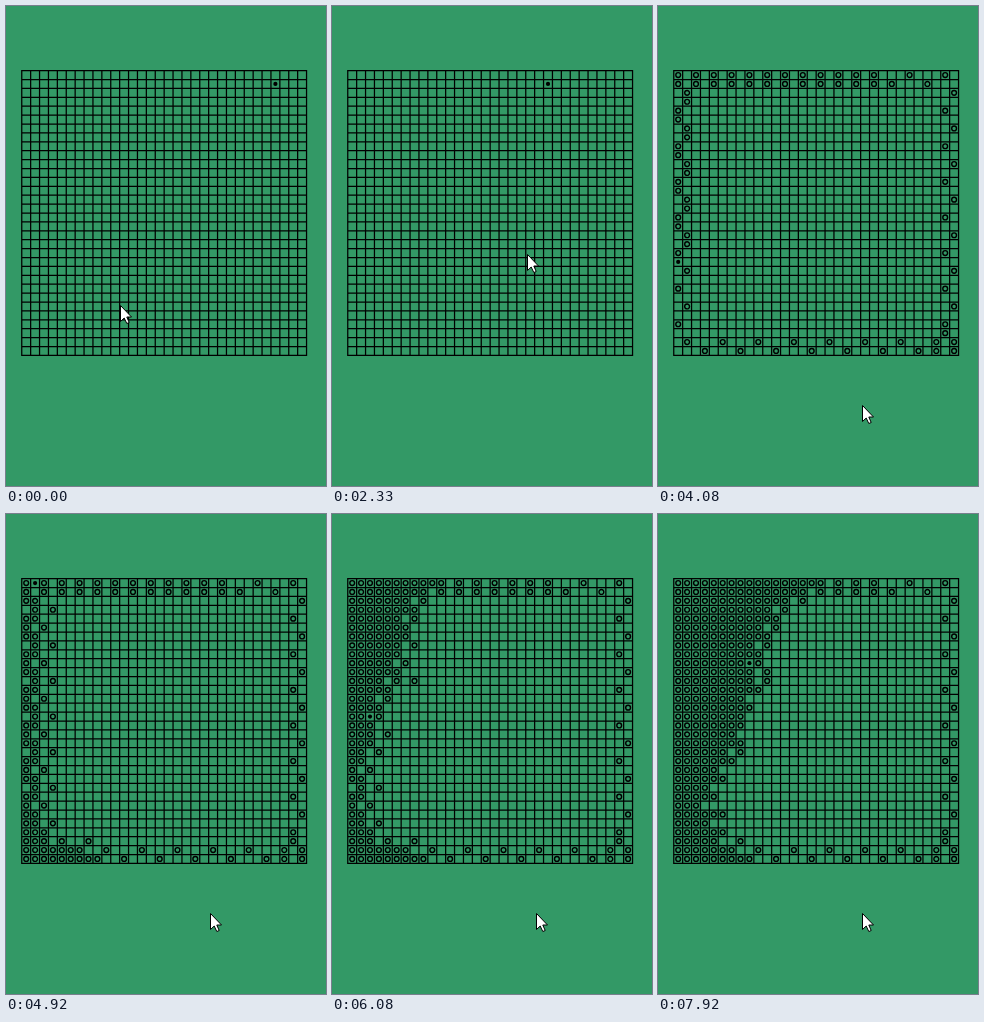
Write an HTML page that moves like this. It is 320 by 480 pixels and loops after 8000 ms.

```html
<!DOCTYPE html>
<html lang="en">
<head>
<meta charset="utf-8">
<title>Knight's tour</title>
<style>
  html, body { margin: 0; width: 100%; height: 100%; overflow: hidden; background: #339966; }
  svg { display: block; }
</style>
</head>
<body>
<svg width="320" height="480" viewBox="0 0 320 480">
  <rect width="320" height="480" fill="#339966"/>
  <path id="grid" fill="none" stroke="#000" stroke-width="1.25" stroke-linecap="square"/>
  <path id="rings" fill="none" stroke="#000" stroke-width="1.4"/>
  <circle id="knight" r="2.1"/>
  <path id="cursor" d="M.5 .5V16.5L4.2 13L6.8 18.5L9.2 17.5L6.8 12H11.5Z" fill="#fff" stroke="#000"/>
</svg>
<script>
const LOOP = 8000, FPS = 12;
const N = 32, PITCH = 8.9, LEFT = 15.75, TOP = 64.6;
const START = [22, 1], FIRST_TICK = 32, MOVES_PER_TICK = 5;
const JUMPS = [[-2, -1], [-2, 1], [-1, -2], [-1, 2], [1, -2], [1, 2], [2, -1], [2, 1]];
const el = id => document.getElementById(id);
const px = c => LEFT + PITCH * (c + 0.5);
const py = r => TOP + PITCH * (r + 0.5);

// Knight's tour by Warnsdorff's rule; the first of equal choices wins.
function makeTour(start, length) {
  const seen = new Set([String(start)]);
  const tour = [start];
  const exits = ([x, y]) => JUMPS.map(([dx, dy]) => [x + dx, y + dy])
    .filter(p => p.every(v => v >= 0 && v < N) && !seen.has(String(p)));
  let cell = start;
  while (tour.length < length) {
    let best = null, fewest = 9;
    for (const p of exits(cell)) {
      const count = exits(p).length;
      if (count < fewest) { fewest = count; best = p; }
    }
    if (!best) break;
    cell = best;
    seen.add(String(cell));
    tour.push(cell);
  }
  return tour;
}

// Cursor glides: first tick, number of ticks, from, control, to, easing.
const easeOut = u => 1 - Math.pow(1 - u, 1.86);
const easeBoth = u => u * u * (3 - 2 * u);
const GLIDES = [
  [1, 4, [114, 299], [174, 328], [235, 358], easeBoth],
  [17, 8, [235, 358], [226, 218], [216, 77], easeBoth],
  [26, 6, [216, 77], [181, 238], [204, 399], easeOut]
];

function cursorAt(tick) {
  let pos = GLIDES[0][2];
  for (const [begin, span, a, b, c, ease] of GLIDES) {
    if (tick <= begin) break;
    const u = ease(Math.min(1, (tick - begin) / span)), v = 1 - u;
    pos = a.map((p, i) => Math.round(v * v * p + 2 * u * v * b[i] + u * u * c[i]));
  }
  return pos;
}

function knightIndex(tick) {
  return Math.max(0, (tick - FIRST_TICK) * MOVES_PER_TICK - 1);
}

function idleCell(tick) {
  return tick < 13 ? [28, 1] : tick < 14 ? [3, 18] : START;
}

const tour = makeTour(START, knightIndex(LOOP * FPS / 1000) + 1);
const ring = ([c, r]) => `M${px(c) - 2.4} ${py(r)}a2.4 2.4 0 1 0 4.8 0a2.4 2.4 0 1 0 -4.8 0`;

let lines = "";
for (let i = 0; i <= N; i++) {
  const d = i * PITCH, size = N * PITCH;
  lines += `M${LEFT + d} ${TOP}v${size}M${LEFT} ${TOP + d}h${size}`;
}
el("grid").setAttribute("d", lines);

let shown = -1;
function draw(ms) {
  const tick = Math.floor((ms % LOOP + 5) * FPS / 1000) % (LOOP * FPS / 1000);
  if (tick === shown) return;
  shown = tick;
  const k = knightIndex(tick);
  const [c, r] = k ? tour[k] : idleCell(tick);
  el("knight").setAttribute("cx", px(c));
  el("knight").setAttribute("cy", py(r));
  el("rings").setAttribute("d", tour.slice(0, k).map(ring).join(""));
  el("cursor").setAttribute("transform", `translate(${cursorAt(tick)})`);
}

const origin = performance.now();
function loop() {
  draw(performance.now() - origin);
  requestAnimationFrame(loop);
}
draw(0);
requestAnimationFrame(loop);
</script>
</body>
</html>
```
